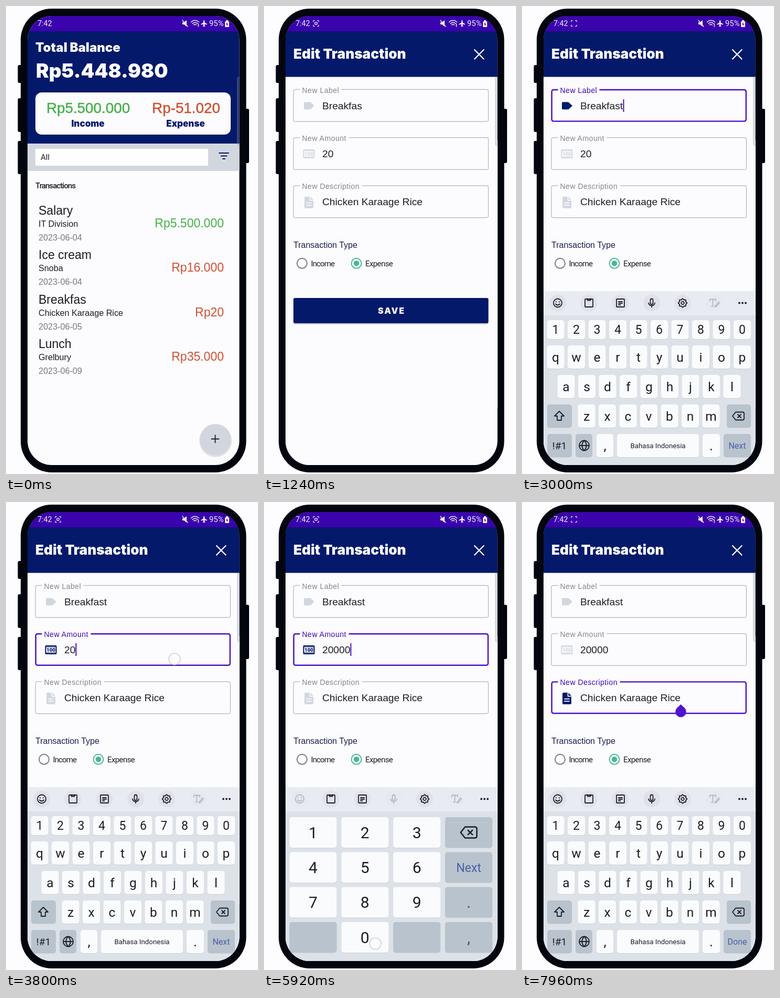
Animation, 480 px wide and 888 px high, one loop 8000 ms. Source, as an HTML page:

```html
<!DOCTYPE html>
<html lang="en">
<head>
<meta charset="utf-8">
<title>Expense tracker</title>
<style>
html, body { margin: 0; width: 100%; height: 100%; overflow: hidden; background: #fdfdff; }
svg { display: block; width: 100%; height: 100%; }
text { font-family: "Liberation Sans", Arial, sans-serif; white-space: pre; }
.heavy { font-family: Inter, sans-serif; font-weight: 900; }
.ui { font-family: Roboto, sans-serif; }
.line { fill: none; stroke-width: 1.8; stroke-linecap: round; stroke-linejoin: round; }
</style>
</head>
<body>
<script>
const LOOP = 8000;
const NAVY = '#04196a', PURPLE = '#3a03ad', VIOLET = '#4a10c4', PAPER = '#fcfcfe', MIST = '#d2d7df';
const INK = '#1c1d24', BODY = '#03050f', GREEN = '#47b04a', ORANGE = '#d05032', TEAL = '#48b795';
const BOARD = '#dce2e8', KEY = '#fafbfd', KEY_DARK = '#b8c3cd', LINK = '#4a5fa8';
let css = '', count = 0;

// Timeline helpers: times in ms, turned into keyframes of the shared loop.
function animate(frames, timing = 'linear') {
  const name = 'm' + count++;
  const steps = frames.map(([t, style]) => `${(t / LOOP * 100).toFixed(3)}%{${style}}`).join('');
  css += `@keyframes ${name}{${steps}}`;
  return `style="animation:${name} ${LOOP}ms ${timing} infinite"`;
}
function during(spans, body, low = 0) {
  const frames = [[0, `opacity:${low}`], [LOOP, `opacity:${low}`]];
  for (const [from, to] of spans) frames.push([from, 'opacity:1'], [to, `opacity:${low}`]);
  return `<g ${animate(frames, 'step-end')}>${body}</g>`;
}
function blink(from, to, body) {
  const spans = [];
  for (let t = from; t < to; t += 1000) spans.push([t, Math.min(t + 500, to)]);
  return during(spans, body);
}

// Drawing helpers
const rect = (x, y, w, h, fill, r = 0, extra = '') =>
  `<rect x="${x}" y="${y}" width="${w}" height="${h}" rx="${r}" fill="${fill}" ${extra}/>`;
const text = (x, y, size, str, fill = INK, extra = '') =>
  `<text x="${x}" y="${y}" font-size="${size}" fill="${fill}" ${extra}>${str}</text>`;
const line = (d, color = INK, extra = '') => `<path class="line" d="${d}" stroke="${color}" ${extra}/>`;
const circle = (x, y, r, fill, extra = '') => `<circle cx="${x}" cy="${y}" r="${r}" fill="${fill}" ${extra}/>`;
const at = (x, y, body) => `<g transform="translate(${x} ${y})">${body}</g>`;
const MID = 'text-anchor="middle"', END = 'text-anchor="end"';
const HEAVY = 'class="heavy"', UI = 'class="ui"';

function listScreen() {
  const items = [
    ['Salary', 'IT Division', '2023-06-04', 'Rp5.500.000', GREEN],
    ['Ice cream', 'Snoba', '2023-06-04', 'Rp16.000', ORANGE],
    ['Breakfas', 'Chicken Karaage Rice', '2023-06-05', 'Rp20', ORANGE],
    ['Lunch', 'Grelbury', '2023-06-09', 'Rp35.000', ORANGE],
  ];
  const rows = items.map(([title, note, date, sum, color], i) => at(0, i * 84.4,
    text(62, 396, 23, title) + text(62, 419, 16.2, note) +
    text(62, 445, 16.2, date, '#777780') + text(415, 420, 23, sum, color, END))).join('');
  const sum = (x, str, color) => text(x, 203, 27.8, str, color, `${MID} stroke="${color}" stroke-width=".5"`);
  return rect(41, 19, 404, 852, PAPER) + rect(41, 19, 404, 29, PURPLE) + rect(41, 48, 404, 213, NAVY) +
    text(56, 87, 24, 'Total Balance', PAPER, HEAVY) +
    text(57, 136, 37, 'Rp5.448.980', PAPER, HEAVY) +
    rect(56, 164, 372, 80, PAPER, 12) +
    sum(156.5, 'Rp5.500.000', GREEN) + sum(343, 'Rp-51.020', ORANGE) +
    text(156, 229, 17, 'Income', NAVY, `${HEAVY} ${MID}`) +
    text(342, 229, 17, 'Expense', NAVY, `${HEAVY} ${MID}`) +
    rect(41, 261, 404, 52, MIST) + rect(56, 271, 329, 32, '#fefeff') +
    text(66, 292, 15, 'All', INK, UI) +
    line('M406 279H424M409.500 284.500H420.500M413 290H417', NAVY) +
    text(56, 346, 15, 'Transactions', INK, `${UI} font-weight="500" letter-spacing="-.95"`) + rows +
    circle(399, 825, 31, '#00000018') + circle(399, 823, 30, MIST) +
    line('M391.500 821.500H405.500M398.500 814.500V828.500', INK);
}

// Field icons, relative to the top edge of the field
const icons = {
  tag: c => `<path d="M78 24H87Q89 24 90 25.500L96 31L90 36.500Q89 38 87 38H78Q76 38 76 36V26Q76 24 78 24Z" fill="${c}"/>`,
  cash: c => rect(75.5, 23.5, 20, 15, 'none', 1, `stroke="${c}" stroke-width="2"`) +
    text(85.5, 34.8, 9.5, '100', c, `${MID} ${UI} font-weight="900"`) +
    line('M77 25.500H94M77 36.500H94', c, 'stroke-opacity=".5"'),
  page: c => `<path d="M79 21H88L94 27V41Q94 43 92 43H79Q77 43 77 41V23Q77 21 79 21Z" fill="${c}"/>` +
    line('M87.500 22V28H93M81 33H90M81 37.500H90', PAPER, 'style="stroke-width:1.700"'),
};
function field(y, label, gapEnd, icon, focus) {
  const look = (border, width, iconColor, labelColor) =>
    rect(55.5 + width / 2, width / 2 - .5, 372.5 - width, 62 - width, 'none', 3.5, `stroke="${border}" stroke-width="${width}"`) +
    rect(68.5, -3, gapEnd - 68.5, 6, PAPER) + icons[icon](iconColor) +
    text(72.5, 6.5, 14, label, labelColor, 'letter-spacing=".5"');
  return at(0, y, look('#b3b2be', 1.2, MIST, '#83828e') + during([focus], look(VIOLET, 2.4, NAVY, VIOLET)));
}
const handle = (x, y) => `<path transform="translate(${x} ${y})" d="M0 -14L7.300 -7.300A10.300 10.300 0 1 1 -7.300 -7.300Z" fill="#4f14d2"/>`;

const FOCUS_LABEL = 1720, TYPE_T = 2960, FOCUS_AMOUNT = 3760, FOCUS_NOTE = 7040;
const ZEROS = [4720, 5320, 5880];

function editScreen() {
  const value = (y, str) => text(111, y, 19.2, str);
  const caret = (x, y, from, to) => blink(from, to, rect(x, y, 2, 24, VIOLET));
  const stages = [0, ...ZEROS, LOOP];
  let amount = '';
  for (let i = 0; i < 4; i++) {
    const end = stages[i + 1], width = (i + 2) * 10.68;
    amount += during([[stages[i], end]], value(287, '20' + '0'.repeat(i))) +
      caret(111 + width, 268, i ? stages[i] : FOCUS_AMOUNT, Math.min(end, FOCUS_NOTE));
  }
  return rect(41, 19, 404, 900, PAPER) + rect(41, 19, 404, 29, PURPLE) + rect(41, 48, 404, 86.5, NAVY) +
    text(56, 100, 26.2, 'Edit Transaction', PAPER, HEAVY) +
    line('M401 83L418.500 100.500M418.500 83L401 100.500', PAPER, 'style="stroke-width:2.400"') +
    field(158.3, 'New Label', 147.5, 'tag', [FOCUS_LABEL, FOCUS_AMOUNT]) +
    field(249.5, 'New Amount', 161.5, 'cash', [FOCUS_AMOUNT, FOCUS_NOTE]) +
    field(340.7, 'New Description', 186.5, 'page', [FOCUS_NOTE, LOOP]) +
    during([[0, TYPE_T]], value(196, 'Breakfas')) + during([[TYPE_T, LOOP]], value(196, 'Breakfast')) +
    amount + value(378, 'Chicken Karaage Rice') +
    caret(187, 177, FOCUS_LABEL, TYPE_T) + caret(192.5, 177, TYPE_T, FOCUS_AMOUNT) +
    caret(302, 359, FOCUS_NOTE, LOOP) +
    during([[FOCUS_LABEL + 120, TYPE_T]], handle(187.5, 216)) +
    during([[FOCUS_AMOUNT + 120, ZEROS[0]]], handle(133, 307)) +
    during([[FOCUS_NOTE + 120, LOOP]], handle(302.5, 398)) +
    text(56, 459, 16, 'Transaction Type', '#191e4e') +
    circle(72.5, 488.3, 9.5, 'none', 'stroke="#797886" stroke-width="2"') +
    circle(176, 488.3, 9.5, 'none', `stroke="${TEAL}" stroke-width="2"`) + circle(176, 488.3, 5.3, TEAL) +
    text(89.5, 493.5, 15, 'Income', INK, `${UI} letter-spacing="-.9"`) +
    text(193, 493.5, 15, 'Expense', INK, `${UI} letter-spacing="-.6"`) +
    rect(57, 556, 370, 48.5, '#00000028', 3) + rect(56, 554, 371.5, 48, NAVY, 3) +
    text(243, 584, 16, 'SAVE', PAPER, `${HEAVY} ${MID} letter-spacing="2"`);
}

const NUMPAD = [4080, 7280];
const key = (x, y, w, h, label, size, fill = KEY, color = INK) =>
  rect(x, y + 1, w, h, '#00000012', 5) + rect(x, y, w, h, fill, 5) +
  text(x + w / 2, y + h / 2 + size * .36, size, label, color, `${UI} ${MID}`);
const erase = (x, y, s) => `<g transform="translate(${x} ${y}) scale(${s})">` +
  line('M-11 0L-5 -7.500H8Q11 -7.500 11 -5V5Q11 7.500 8 7.500H-5ZM-1 -3L5 3M5 -3L-1 3') + '</g>';

function toolbar() {
  const button = (x, body) => at(x, 563.5, circle(0, 0, 16, '#0000000a') + body);
  const box = line('M-6.500 -7.500H6.500Q7.500 -7.500 7.500 -6.500V6.500Q7.500 7.500 6.500 7.500H-6.500Q-7.500 7.500 -7.500 6.500V-6.500Q-7.500 -7.500 -6.500 -7.500Z');
  const smile = line('M-8 0A8 8 0 1 1 8 0A8 8 0 1 1 -8 0M-4 2Q0 6 4 2M-3 -2.500V-2M3 -2.500V-2');
  const mic = line('M-2.500 -5.500A2.500 2.500 0 0 1 2.500 -5.500V0A2.500 2.500 0 0 1 -2.500 0ZM-6 0Q-5 5 0 5Q5 5 6 0M0 5V8');
  let gear = '';
  for (let i = 0; i <= 48; i++) {
    const a = i / 48 * 2 * Math.PI, r = 7.3 + Math.cos(a * 8);
    gear += `${i ? 'L' : 'M'}${(r * Math.cos(a)).toFixed(1)} ${(r * Math.sin(a)).toFixed(1)}`;
  }
  const letters = [[0, NUMPAD[0]], [NUMPAD[1], LOOP]];
  return rect(41, 541, 404, 46, '#e8ecf2') +
    during(letters, button(68, smile), .25) +
    button(127.5, box + line('M-3 -8V-5H3V-8')) +
    button(187.5, box + line('M-3.500 -2.500H3.500M-3.500 .5H3.500M-3.500 3.500H0')) +
    during(letters, button(247, mic), .25) +
    button(306, line(gear) + circle(0, 0, 2.8, 'none', `stroke="${INK}" stroke-width="1.800"`)) +
    `<g opacity=".25">${button(366, line('M-8 -4V-7H3V-4M-2.500 -7V6H-5M2 6L8 -2L10 0L4 7H1Z'))}</g>` +
    [-6, 0, 6].map(dx => circle(420 + dx, 563.5, 1.9, INK)).join('');
}

function letterKeys() {
  const row = (chars, x, y, h, size) => [...chars].map((c, i) => key(x - 16.5 + i * 39.5, y, 33, h, c, size)).join('');
  const action = label => key(384, 812, 52, 44, label, 16, KEY_DARK, LINK);
  return row('1234567890', 64, 596, 36, 23) + row('qwertyuiop', 64, 644, 44, 24.5) +
    row('asdfghjkl', 84, 700, 44, 24.5) + row('zxcvbnm', 123, 756, 44, 24.5) +
    key(48, 756, 47, 44, '', 1, KEY_DARK) + key(390, 756, 46, 44, '', 1, KEY_DARK) +
    line('M71 769L80 778H75V786H67V778H62Z') + erase(412, 778, 1) +
    key(48, 812, 47, 44, '!#1', 19, KEY_DARK) + key(102, 812, 32, 44, '', 1, KEY_DARK) +
    line('M109 834A9.500 9.500 0 1 1 128 834A9.500 9.500 0 1 1 109 834H128M118.500 824.500Q110 834 118.500 843.500Q127 834 118.500 824.500') +
    key(142, 812, 32, 44, ',', 26) + key(181, 812, 156, 44, 'Bahasa Indonesia', 13.3) + key(344, 812, 33, 44, '.', 26) +
    during([[0, NUMPAD[1]]], action('Next')) + during([[NUMPAD[1], LOOP]], action('Done'));
}

function numberKeys() {
  const labels = ['1', '2', '3', '', '4', '5', '6', 'Next', '7', '8', '9', '.', '', '0', '', ','];
  return rect(41, 587, 404, 284, BOARD) + labels.map((label, i) => {
    const digit = label >= '0' && label <= '9', next = label === 'Next';
    return key(48.5 + i % 4 * 98.8, 598 + Math.floor(i / 4) * 66.3, 90, 58, label,
      next ? 23 : 30, digit ? KEY : KEY_DARK, next ? LINK : digit ? INK : '#4a5360');
  }).join('') + erase(390, 627, 1.4);
}

function statusBar() {
  const white = '#f4f2f8';
  const dot = [0, 2500, 5000].map(t => [t + 850, t + 1900]);
  const corners = line('M94 30V27.500H96.500M101.500 27.500H104V30M104 36V38.500H101.500M96.500 38.500H94V36', white, 'style="stroke-width:1.200"');
  return text(60, 38, 14.3, '7:42', white, UI) +
    during([[300, LOOP]], corners) +
    during(dot, circle(99, 33, 2.3, 'none', `stroke="${white}" stroke-width="1.300"`)) +
    `<path d="M336 31H339L344 27V39L339 35H336Z" fill="${white}"/>` + line('M336 27L346 39', white, 'style="stroke-width:1.400"') +
    line('M352.500 30.500Q360 24 367.500 30.500M355 33.500Q360 29 365 33.500M357.500 36Q360 34 362.500 36M366.500 34V39', white, 'style="stroke-width:1.500"') +
    `<path d="M376 28Q377.200 26 378.400 28V31.500L383 34V35.500L378.400 34.500V37.500L380 39H374.500L376 37.500V34.500L371.500 35.500V34L376 31.500Z" fill="${white}"/>` +
    text(387, 38, 14.8, '95%', white, UI) +
    rect(417, 29, 8, 11, white, 1.5) + rect(419, 27, 4, 2, white) +
    `<path d="M421.700 30.500L418.800 35H421L420.300 38.500L423.300 33.800H421Z" fill="${PURPLE}"/>`;
}

function tap(x, y, from, to) {
  return during([[from, to]], circle(x, y, 11, '#ffffff66', 'stroke="#c4c5cc" stroke-width="1.200"'));
}

const opening = animate([
  [0, 'transform:translateY(68px);opacity:0'], [600, 'transform:translateY(68px);opacity:0'],
  [680, 'transform:translateY(47px);opacity:1'],
  [720, 'transform:translateY(33.5px);opacity:1;animation-timing-function:ease-out'],
  [960, 'transform:none;opacity:1'], [LOOP, 'transform:none;opacity:1']]);
const rising = animate([
  [0, 'transform:translateY(340px)'],
  [1840, 'transform:translateY(340px);animation-timing-function:cubic-bezier(.2,.6,.2,1)'],
  [2120, 'transform:none'], [LOOP, 'transform:none']]);

const phone =
  rect(22.5, 112, 12, 34, BODY, 3) + rect(22.5, 175, 12, 64, BODY, 3) + rect(22.5, 256, 12, 63, BODY, 3) +
  rect(450, 195, 13, 103, BODY, 3) + rect(28, 5, 429.5, 880, BODY, 59);

const screen =
  listScreen() + during([[620, LOOP]], rect(41, 19, 404, 852, BODY)) +
  `<g ${opening}>${editScreen()}</g>` +
  `<g ${rising}>${rect(41, 541, 404, 330, BOARD) + toolbar() + letterKeys() + during([NUMPAD], numberKeys())}</g>` +
  rect(440.5, 135, 8, 130, '#8c8f9a48', 3, 'stroke="#a0a3ae60"') + statusBar() +
  tap(250, 582, 400, 540) + tap(280, 198, 1600, 1760) + tap(222, 668, 2860, 3000) + tap(321, 298, 3680, 3840) +
  ZEROS.map(t => tap(212, 838, t - 100, t + 120)).join('') + tap(330, 380, 6960, 7120);

document.body.innerHTML = `<svg viewBox="0 0 480 888" xmlns="http://www.w3.org/2000/svg">
  <clipPath id="glass"><rect x="41" y="19" width="403.500" height="852" rx="46"/></clipPath>
  ${rect(0, 0, 480, 888, '#fdfdff') + phone}<g clip-path="url(#glass)">${screen}</g></svg>`;
document.head.appendChild(document.createElement('style')).textContent = css;
</script>
</body>
</html>
```
